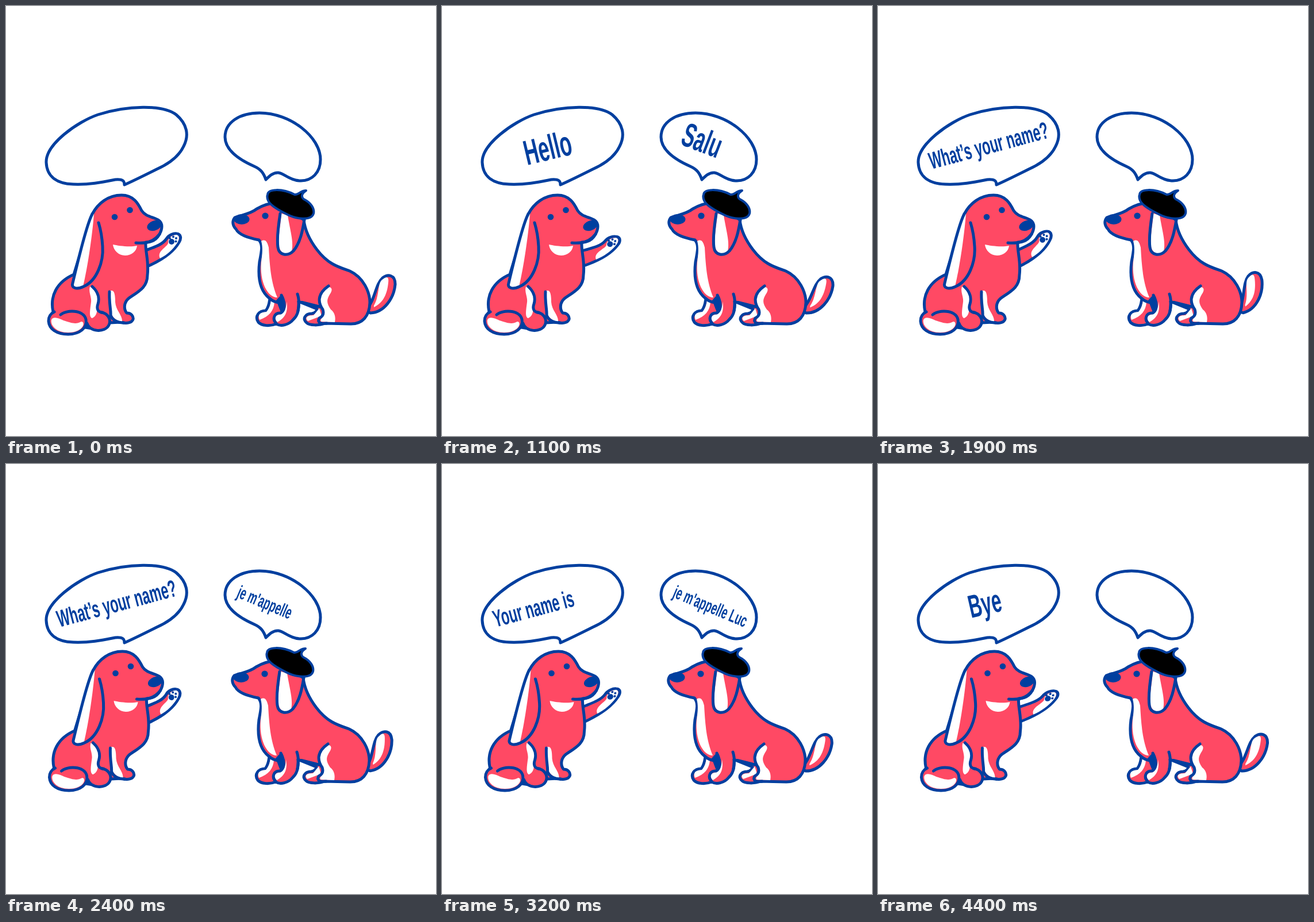
An HTML page that plays this animation: 748 px wide and 748 px high, repeating every 4.5 s.

```html
<!DOCTYPE html>
<html lang="en">
<head>
<meta charset="utf-8">
<title>Two dogs talking</title>
<style>
  html, body { margin: 0; width: 100%; height: 100%; overflow: hidden; background: #fff; }
  svg { display: block; width: 100%; height: 100%; }
  .line { fill: none; stroke: #003f9f; stroke-width: 5; stroke-linecap: round; stroke-linejoin: round; }
  .skin { fill: #ff4964; }
  .white { fill: #fff; }
  .blue { fill: #003f9f; }
  .beret { fill: #000; stroke-width: 4; }
  text { fill: #003f9f; font-family: "Liberation Sans", Arial, sans-serif; font-weight: 700; }
</style>
</head>
<body>
<svg viewBox="0 0 748 748">
  <!-- speech bubbles -->
  <g class="line">
    <path d="M70 272C69 240 125 201 160 189C210 173 273 171 296 189C315 205 319 225 309 244C300 263 280 276 262 284C240 295 222 304 206 311C206 304 203 301 190 302C165 307 145 311 117 310C90 309 71 298 70 272Z"/>
    <path d="M452 302C448 290 443 284 432 279C405 267 381 250 381 228C381 202 407 186 441 186C495 186 547 228 547 267C547 290 532 304 513 304C495 304 483 291 474 290C465 289 458 296 452 302Z"/>
  </g>
  <text id="left"></text>
  <text id="right"></text>

  <!-- waving dog -->
  <g id="waver">
    <g id="arm">
      <path class="line skin" d="M232 430L246 424C262 418 273 414 279 405C283 398 292 395 297 396C305 397 305 405 301 411C293 425 275 440 248 452L232 456Z"/>
      <path class="white" d="M268 439C262 427 279 420 282 413C281 403 290 398 297 398C303 400 301 407 298 412C290 424 280 433 268 439Z"/>
      <g class="blue">
        <circle cx="288" cy="410" r="5"/>
        <circle cx="285" cy="404" r="2"/>
        <circle cx="291" cy="401.500" r="2"/>
        <circle cx="296" cy="404" r="2"/>
        <circle cx="295.500" cy="409.500" r="2"/>
      </g>
    </g>
    <path class="line skin" d="M150 362C160 343 178 329 201 329C222 329 230 344 236 356C243 367 258 367 266 373C273 378 272 388 267 397C262 406 254 411 243 411C242 428 249 444 246 468C246 490 230 497 214 508C204 516 205 528 210 534C218 534 222 540 221 545C219 551 210 553 200 550L180 551C175 562 165 566 150 561L82 550Q76 540 82 532C76 505 88 480 118 467Z"/>
    <g class="white">
      <path d="M180 496C188 492 190 500 190 515C191 530 203 538 202 549C188 548 180 535 180 520Z"/>
      <path d="M146 488C162 498 163 512 160 518C158 528 160 538 150 543C144 541 146 530 148 515C149 505 143 498 146 488Z"/>
      <path d="M186 415C195 417 215 420 228 417C227 427 218 434 207 434C196 434 187 425 186 415Z"/>
    </g>
    <path class="line" d="M267 397C255 412 242 413 226 412M180 497C179 518 183 530 182 538C186 548 196 551 205 551"/>
    <path class="line skin" d="M141 552C145 567 172 569 179 555C184 545 176 534 166 533"/>
    <path class="line" d="M150 488C160 497 163 508 160 518C157 527 160 533 168 533"/>
    <path class="line skin" d="M95 537C105 528 135 528 139 545C142 560 128 571 108 571C88 571 75 562 74 548C74 539 78 535 84 532"/>
    <path class="white" d="M79 546C82 539 92 543 100 547C115 552 122 554 131 549C139 549 135 568 108 568C88 568 77 556 79 546Z"/>
    <path class="skin" d="M150 362C140 380 120 465 116 482C113 490 122 494 135 488C158 478 170 445 168 418C167 400 165 390 161 376Z"/>
    <path class="white" d="M150 362C140 380 120 465 116 482C114 490 125 491 134 488C142 455 150 400 153 362Z"/>
    <path class="line" d="M150 362C140 380 120 465 116 482C113 490 122 494 135 488C158 478 170 445 168 418C167 400 165 390 161 377"/>
    <g class="blue">
      <circle cx="189" cy="367" r="5.300"/>
      <circle cx="215.500" cy="355" r="5.300"/>
      <ellipse cx="258" cy="382" rx="13" ry="8.500" transform="rotate(-20 258 382)"/>
    </g>
  </g>

  <!-- dog with a beret -->
  <g id="listener">
    <g id="tail">
      <path class="line skin" d="M626 530C643 510 642 485 655 473C664 466 677 467 677 484C675 508 658 533 634 534Z"/>
      <path class="white" d="M640 521C651 502 645 481 656 475C664 469 666 473 665 481C663 502 656 516 640 524Z"/>
    </g>
    <path class="line skin" d="M398 368C408 364 425 362 436 353C450 345 465 340 480 345L518 372C520 390 528 407 541 424C560 449 578 454 598 461C622 472 633 498 633 516C632 540 620 553 600 553L555 552C545 556 528 556 523 551C515 545 520 535 532 535C538 534 541 530 541 527L509 514C510 528 508 538 500 545C492 555 478 558 470 553C460 557 445 557 439 550C432 540 440 530 452 530C458 522 458 515 459 509C440 495 438 470 441 445C445 425 447 415 440 407C420 403 405 398 400 388C394 382 393 374 398 368Z"/>
    <g class="white">
      <path d="M444 409C452 404 455 412 457 420C459 455 461 480 472 507C455 507 441 480 444 445C446 430 447 420 444 409Z"/>
      <path d="M461 512L467 515C466 530 458 540 441 546C437 535 444 533 453 532C459 525 460 518 461 512Z"/>
      <path d="M488 514C491 530 487 542 472 550C463 540 472 537 479 536C486 530 488 522 488 514Z"/>
      <path d="M535 538L545 526L549 539L525 548C519 541 525 538 535 538Z"/>
      <path d="M560 489C567 488 569 494 563 502C557 512 558 518 565 528C574 535 573 545 572 550L548 549C545 543 556 540 552 527C543 512 546 498 560 489Z"/>
    </g>
    <path class="blue" d="M470 512L478 503L485 520L478 533Z"/>
    <path class="line" d="M459 509C466 515 472 517 480 515M479 503C488 520 484 530 478 534C466 533 463 545 470 552M507 501C510 510 510 520 508 530M509 514L545 523M561 487C545 498 540 512 551 528C554 537 549 541 545 543C540 552 550 553 558 552"/>
    <path class="white" d="M479 361L490 364C494 390 501 410 497 427C488 435 477 430 475 418C473 400 478 380 479 361Z"/>
    <path class="line" d="M477 361C474 380 471 405 473 420C475 434 490 436 500 426C512 412 516 390 519 372"/>
    <path class="line beret" d="M455 328C456 318 480 317 502 328C509 329 512 321 522 321C514 326 513 332 518 336C530 342 537 352 535 361C531 374 505 371 488 362C468 352 451 342 455 328Z"/>
    <g class="blue">
      <circle cx="451" cy="365" r="5.600"/>
      <ellipse cx="410" cy="371" rx="13.500" ry="9"/>
    </g>
  </g>
</svg>

<script>
const LOOP = 4500, STEP = 100;
const CONDENSE = 0.56;
const $ = id => document.getElementById(id);

// time, arm angle, arm reach, tail angle
const poses = [
  [0, 0, 1, 0], [600, -15, 0.97, -24], [1100, 6, 1.04, 4], [1650, -15, 1, -24],
  [1900, -4, 1, -11], [2250, 3, 1, 2], [2400, -2, 0.98, -6], [2800, -15, 1, -24],
  [3200, 0, 1.07, 3], [3350, 3, 1.08, 4], [3900, -15, 1.04, -24], [4400, 4, 1.09, 2],
  [4500, 0, 1, 0]
];

// spoken lines, revealed by letter ("") or by word (" ")
const speech = [
  { side: "left", text: "Hello", split: "", from: 200, gap: 100, until: 1300, x: 148, y: 277, turn: -13.5, size: 61 },
  { side: "right", text: "Salut", split: "", from: 800, gap: 100, until: 1700, x: 413, y: 240, turn: 21, size: 59 },
  { side: "left", text: "What’s your name?", split: " ", from: 1400, gap: 200, until: 2900, x: 93, y: 284, turn: -15, size: 41.5 },
  { side: "right", text: "je m'appelle Luc", split: " ", from: 2200, gap: 200, until: 4000, x: 400, y: 231, turn: 23, size: 31.5 },
  { side: "left", text: "Your name is Luc", split: " ", from: 3000, gap: 100, until: 4000, x: 93, y: 284, turn: -15, size: 41.5 },
  { side: "left", text: "Bye", split: "", from: 4200, gap: 100, until: LOOP, x: 162, y: 268, turn: -13, size: 56 }
];

function poseAt(t) {
  const i = poses.findIndex(p => p[0] > t);
  const a = poses[i - 1], b = poses[i];
  const k = (1 - Math.cos(Math.PI * (t - a[0]) / (b[0] - a[0]))) / 2;
  return a.map((v, j) => v + (b[j] - v) * k);
}

function say(side, t) {
  const node = $(side);
  const line = speech.find(s => s.side === side && t >= s.from && t < s.until);
  if (!line) {
    node.textContent = "";
    return;
  }
  const shown = Math.floor((t - line.from) / line.gap) + 1;
  node.textContent = line.text.split(line.split).slice(0, shown).join(line.split);
  node.setAttribute("font-size", line.size);
  node.setAttribute("transform",
    `translate(${line.x} ${line.y}) rotate(${line.turn}) scale(${CONDENSE} 1)`);
}

function draw(now) {
  const t = Math.floor((now % LOOP) / STEP) * STEP;
  const [, arm, reach, tail] = poseAt(t);
  const late = t >= 2000;
  $("arm").setAttribute("transform",
    `translate(240 435) rotate(${arm - 30}) scale(${reach} ${1 / reach}) rotate(30) translate(-240 -435)`);
  $("tail").setAttribute("transform", `rotate(${tail} 633 528)`);
  $("waver").setAttribute("transform", late ? "translate(1.5 -3)" : "");
  $("listener").setAttribute("transform", late ? "translate(-1 0)" : "");
  say("left", t);
  say("right", t);
}

const start = performance.now();
function tick() {
  draw(performance.now() - start);
  requestAnimationFrame(tick);
}
tick();
</script>
</body>
</html>
```
